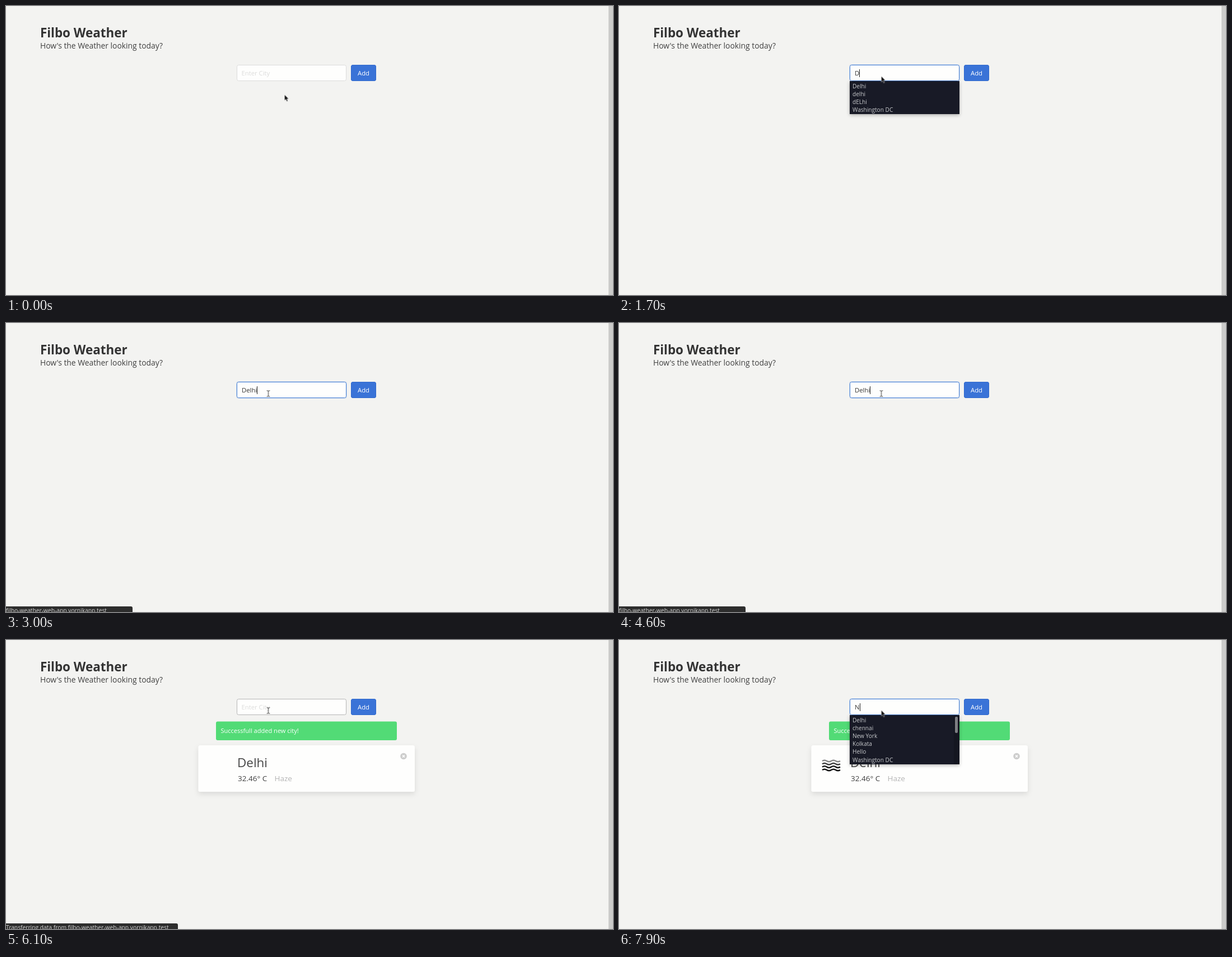
These frames come from a looping animation (1084x516 px, 8 s). An HTML page:

```html
<!DOCTYPE html>
<html lang="en">
<head>
<meta charset="utf-8">
<title>Filbo Weather</title>
<style>
html, body { margin: 0; width: 100%; height: 100%; overflow: hidden; background: #f3f3f1; }
body { position: relative; font-family: "Open Sans", "Noto Sans", sans-serif; }
svg { position: absolute; left: 0; top: 0; }

h1, p { position: absolute; left: 61px; margin: 0; white-space: nowrap; }
h1 { top: 32.5px; font-size: 22.4px; font-weight: 700; line-height: 30px; color: #333; }
p { top: 61px; font-size: 13.85px; line-height: 20px; color: #404040; }

.box { fill: #fefefd; stroke: #dbdbdb; }
.hover { stroke: #b5b5b5; }
.focus { stroke: #4a82d6; }
.glow { fill: none; stroke: #3273dc; stroke-opacity: .25; }
.button { fill: #3a73d7; stroke: #3069cd; }
.control { font-size: 11.3px; }

/* Every timed part runs on the same 8 s clock and switches without easing. */
.timed, .typed b { animation: 8s step-end -4ms infinite; }
.timed { opacity: 0; }

.typed { position: absolute; left: 421px; top: 105.5px; line-height: 28px; white-space: nowrap; color: #363636; }
.typed b { font-weight: 400; font-size: 0; line-height: 0; }
.caret { display: inline-block; width: 1px; height: 14px; margin-right: -1px; vertical-align: -3px; background: #222; }

.menu {
  position: absolute; left: 412px; top: 134px; width: 195.5px; box-sizing: border-box;
  margin: 0; padding: 1.5px 5px 1px; list-style: none;
  font-size: 10.1px; line-height: 14.2px; color: #c8cacd;
  background: #181a26; box-shadow: 0 2px 6px rgba(0, 0, 0, .28);
}
.long { height: 87.5px; }
.long::before, .long::after { content: ""; position: absolute; }
.long::before { right: 0; top: 0; width: 10px; height: 100%; background: #141620; }
.long::after { right: 3px; top: 3px; width: 4.5px; height: 29px; border-radius: 2px; background: #7d7e83; }

.status { position: absolute; left: 0; top: 506px; height: 10px; overflow: hidden; border-radius: 0 3px 0 0;
  background: #2d2d2d; color: #d4d4d4; font-size: 10.25px; line-height: 15px; white-space: nowrap; }
.short { width: 226px; }
.wide { width: 307px; }

.placeholder { animation-name: placeholder; }
.hover { animation-name: hover; }
.focused { animation-name: focus; }
.caret { animation-name: caret; }
.m-four { animation-name: m-four; }
.m-three { animation-name: m-three; }
.long { animation-name: m-long; }
.short { animation-name: waiting; }
.wide { animation-name: transfer; }
.result { animation-name: result; }
.haze { animation-name: haze; }
.arrow { animation-name: arrow; }
.beam { animation-name: beam; }
.typed .k1 { animation-name: k1; }
.typed .k2 { animation-name: k2; }
.typed .k3 { animation-name: k3; }
.typed .k4 { animation-name: k4; }
.typed .k5 { animation-name: k5; }
.typed .k6 { animation-name: k6; }

@keyframes placeholder { 0%, 75% { opacity: 1 } 17.5%, 98.75% { opacity: 0 } }
@keyframes hover { 8.75%, 75% { opacity: 1 } 12.5%, 83.75% { opacity: 0 } }
@keyframes focus { 12.5%, 83.75% { opacity: 1 } 75% { opacity: 0 } 100% { opacity: 1 } }
@keyframes caret {
  12.5%, 57.5%, 83.75%, 98.75% { opacity: 1 }
  43.75%, 75%, 97.5% { opacity: 0 }
}
@keyframes k1 { 17.5% { font-size: 1em } 75% { font-size: 0 } }
@keyframes k2 { 26.25% { font-size: 1em } 75% { font-size: 0 } }
@keyframes k3 { 28.75% { font-size: 1em } 75% { font-size: 0 } }
@keyframes k4 { 31.25% { font-size: 1em } 75% { font-size: 0 } }
@keyframes k5 { 32.5% { font-size: 1em } 75% { font-size: 0 } }
@keyframes k6 { 98.75% { font-size: 1em } }
@keyframes m-four { 21.25% { opacity: 1 } 27.5% { opacity: 0 } }
@keyframes m-three { 27.5% { opacity: 1 } 37.5% { opacity: 0 } }
@keyframes m-long { 86.25% { opacity: 1 } }
@keyframes waiting { 37.5% { opacity: 1 } 73.75% { opacity: 0 } }
@keyframes transfer { 73.75% { opacity: 1 } 80% { opacity: 0 } }
@keyframes result { 75% { opacity: 1 } }
@keyframes haze { 78.75% { opacity: 1 } }
@keyframes arrow {
  0% { opacity: 1; transform: translate(497.5px, 158.5px) }
  7.5% { opacity: 1; transform: translate(485px, 146px) }
  8.75%, 37.5% { opacity: 0; transform: translate(468.5px, 125.5px) }
  21.25%, 86.25%, 100% { opacity: 1; transform: translate(468.5px, 125.5px) }
}
@keyframes beam {
  8.75% { opacity: 1; transform: translate(473.5px, 129px) }
  10%, 37.5% { opacity: 1; transform: translate(468.5px, 126px) }
  21.25%, 86.25% { opacity: 0; transform: translate(468.5px, 126px) }
}
</style>
</head>
<body>
<h1>Filbo Weather</h1>
<p>How's the Weather looking today?</p>

<svg width="1084" height="516">
  <defs>
    <filter id="soft" x="-10%" y="-20%" width="120%" height="150%">
      <feDropShadow dx="0" dy="4" stdDeviation="5" flood-color="#000" flood-opacity=".1"/>
    </filter>
    <path id="wave" d="M0 0q4-2.6 8 0t8 0 8 0 8 0" fill="none" stroke-width="2.5"/>
  </defs>
  <rect x="1076" width="8" height="516" fill="#cbcbca"/>

  <rect class="box" x="412.5" y="105.5" width="195" height="28" rx="3"/>
  <rect class="box hover timed" x="412.5" y="105.5" width="195" height="28" rx="3"/>
  <g class="focused timed">
    <rect class="glow" x="411.5" y="104.5" width="197" height="30" rx="4"/>
    <rect class="box focus" x="412.5" y="105.5" width="195" height="28" rx="3"/>
  </g>
  <text class="control placeholder timed" x="420.5" y="123.8" fill="#dcdcdb">Enter City</text>

  <rect class="button" x="616.5" y="105.5" width="44" height="28" rx="2.5"/>
  <text class="control" x="638.5" y="123.8" text-anchor="middle" fill="#fff">Add</text>

  <g class="result timed">
    <rect x="375" y="145.5" width="323" height="33.5" rx="3" fill="#52db76"/>
    <text x="383.5" y="166.3" font-size="11.05" fill="#fff">Successfull added new city!</text>
    <rect x="343.5" y="188" width="386.5" height="83" rx="3.5" fill="#fefefd" filter="url(#soft)"/>
    <text x="413" y="227" font-size="22.4" fill="#464646">Delhi</text>
    <text x="414" y="252" font-size="13.5" fill="#404040">32.46° C</text>
    <text x="479.5" y="252" font-size="13.5" fill="#b5b5b5">Haze</text>
    <circle cx="710" cy="207.5" r="5.8" fill="#cdcdcc"/>
    <path d="M708 205.5l4 4m0-4l-4 4" stroke="#fff" stroke-width="1.6"/>
  </g>
  <g class="haze timed">
    <use href="#wave" x="363" y="216" stroke="#858585"/>
    <use href="#wave" x="363" y="221.3" stroke="#3c3c3c"/>
    <use href="#wave" x="363" y="226.6" stroke="#1c1c1c"/>
    <use href="#wave" x="363" y="232" stroke="#111"/>
  </g>
</svg>

<div class="typed control"><b class="k1">D</b><b class="k2">e</b><b class="k3">l</b><b class="k4">h</b><b class="k5">i</b><b class="k6">N</b><i class="caret timed"></i></div>

<ul class="menu m-four timed"><li>Delhi<li>delhi<li>dELhi<li>Washington DC</ul>
<ul class="menu m-three timed"><li>Delhi<li>delhi<li>dELhi</ul>
<ul class="menu long timed"><li>Delhi<li>chennai<li>New York<li>Kolkata<li>Hello<li>Washington DC</ul>

<div class="status short timed">filbo-weather-web-app.vornikapp.test</div>
<div class="status wide timed">Transferring data from filbo-weather-web-app.vornikapp.test</div>

<svg width="1084" height="516">
  <path class="arrow timed" d="M0 0v10.2l2.3-2.1 1.7 3.8 1.8-.8-1.7-3.7h3.2z" fill="#111" stroke="#fff" stroke-width=".6" stroke-opacity=".8"/>
  <path class="beam timed" d="M-2.8-5.2q2.3 0 2.8.8.5-.8 2.8-.8M-2.8 5.2q2.3 0 2.8-.8.5.8 2.8.8M0-4.4v8.8" fill="none" stroke="#333"/>
</svg>
</body>
</html>
```
